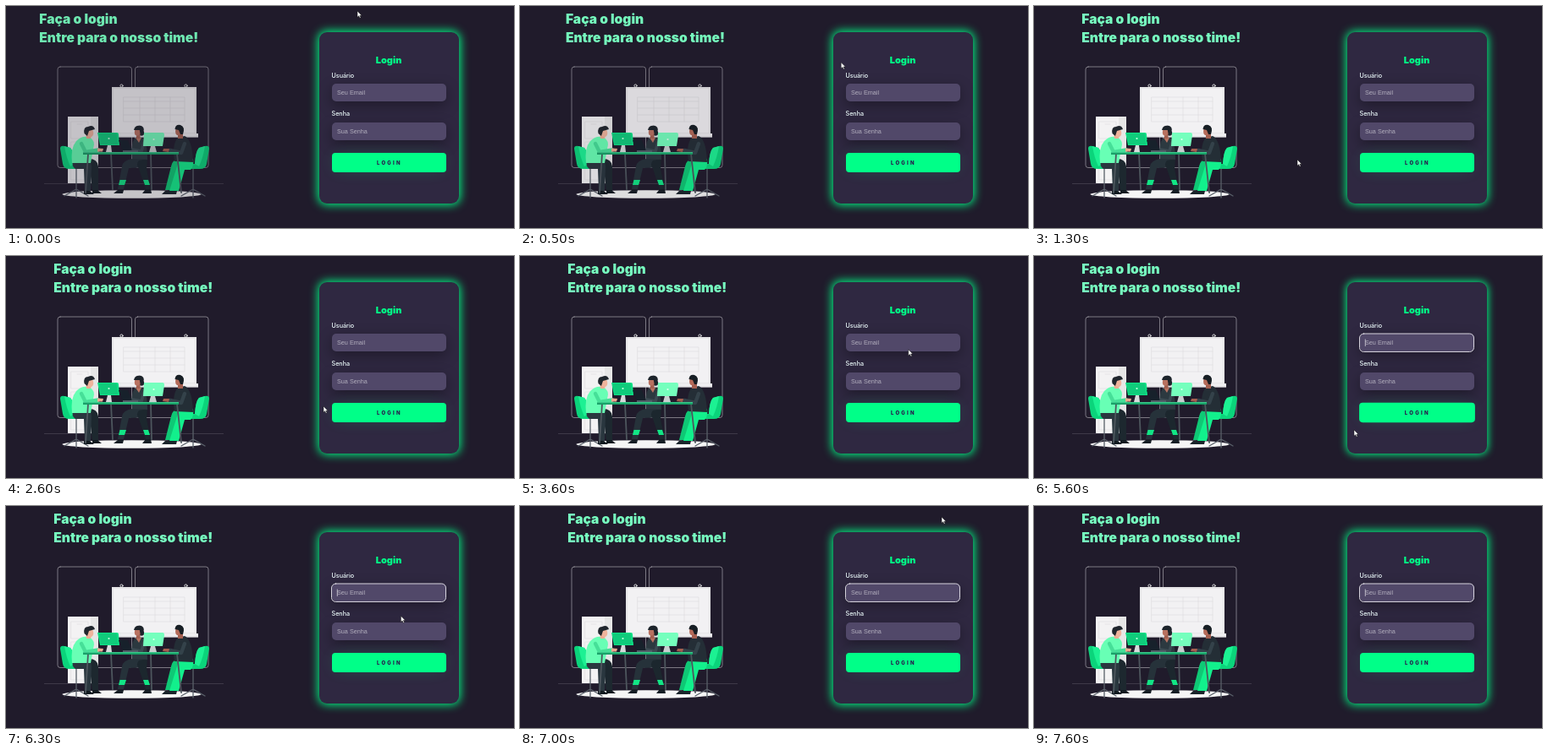
An HTML page that plays this animation: 600 by 263 pixels, repeating every 7.7 s.

```html
<!DOCTYPE html>
<html lang="pt">
<head>
<meta charset="utf-8">
<title>Login</title>
<style>
html, body { margin: 0; width: 100%; height: 100%; overflow: hidden; background: #201b2b; }
#stage { position: relative; width: 600px; height: 263px; overflow: hidden; background: #201b2b; }
#stage div, svg { position: absolute; box-sizing: border-box; }
svg { left: 0; top: 0; }
#card { left: 369.5px; top: 30.5px; width: 165px; height: 203px; border-radius: 9px; background: #2f2841; }
.field { left: 384.5px; width: 135px; height: 21px; border-radius: 5px; background: #514869; box-shadow: 0 5px 16px #00000056; }
#button { left: 384.5px; top: 174px; width: 135px; height: 23px; border-radius: 4px; background: #00ff88; box-shadow: 0 0 20px -6px #00ff8052; }
text { font-family: Inter, "Open Sans", sans-serif; }
.title { font-size: 15.6px; font-weight: 900; fill: #77ffc0; }
.label { font-size: 7.2px; font-weight: 500; fill: #f0ffff; }
.hint { font: 7.25px "Liberation Sans", Arial, sans-serif; fill: #b3afbe; }
.line { fill: none; stroke-linecap: round; stroke-linejoin: round; }
</style>
</head>
<body>
<div id="stage">
<div id="card"></div>
<div class="field" id="user" style="top:92px"></div>
<div class="field" style="top:137.5px"></div>
<div id="button"></div>
<svg width="600" height="263" viewBox="0 0 600 263">
  <g id="title" class="title">
    <text x="56.3" y="20.5">Faça o login</text>
    <text x="56.3" y="43">Entre para o nosso time!</text>
  </g>

  <g id="scene">
    <!-- room -->
    <g class="line" stroke="#a5a3aa" stroke-width=".7">
      <rect x="61" y="72" width="87.5" height="119.5" rx="3"/>
      <rect x="152.5" y="72" width="86.5" height="119.5" rx="3"/>
    </g>
    <path d="M45 210.5H257" stroke="#4b4755" stroke-width=".7"/>
    <ellipse cx="148.5" cy="223" rx="82" ry="4.8" fill="#f5f5f5"/>
    <path d="M73 131H109V210H73Z" fill="#e6e6e6"/>
    <path d="M73 131H100V210H73Z" fill="#f3f2f3"/>
    <path class="line" d="M77 137H97V157H77ZM77 161H97V181H77ZM77 185H97V206H77ZM84 140H90M84 164H90M84 188H90" stroke="#dedde0" stroke-width=".7"/>
    <g class="line" stroke="#e4e4e4">
      <circle cx="136.5" cy="94.5" r="1.6"/>
      <circle cx="212.5" cy="94.5" r="1.6"/>
    </g>
    <path d="M125 96H225V152H125Z" fill="#e6e5e7"/>
    <path d="M127 98H223V150H127Z" fill="#f2f1f3"/>
    <path d="M123 151H227V155.5H123Z" fill="#efeef0"/>
    <path d="M123 155H227" stroke="#cfced2" stroke-width=".6"/>
    <path class="line" d="M139 108H211V137H139ZM139 113H211M139 121H211M139 129H211M158 108V137M176 108V137M194 108V137" stroke="#dcdbde" stroke-width=".6"/>

    <!-- chairs -->
    <g id="chair">
      <path class="line" d="M83 192V218M83 217L69 225M83 217L97 225M83 217V227" stroke="#596069" stroke-width="1.3"/>
      <path d="M64 169Q64 165 69 166L76 168Q80 172 81 187H98Q100 193 96 193H75Q68 193 67 187Z" fill="#0bd47b"/>
      <path d="M69 166L76 168Q80 172 81 187L76 190Q71 179 69 166Z" fill="#1cf193"/>
    </g>
    <use href="#chair" transform="translate(304 0) scale(-1 1)"/>

    <!-- person at the left -->
    <path d="M80 181H98Q108 181 109 190L109 219H102L99 193L84 191Q79 190 80 181Z" fill="#1d282f"/>
    <path d="M79 181H95Q101 182 101 190L100 219H93L92 193H82Q77 190 79 181Z" fill="#2a373f"/>
    <path d="M92 219H99L104 223H92ZM102 218H108L113 222H102Z" fill="#121a20"/>
    <path d="M78 186Q76 168 83 160Q89 154 96 155Q104 157 104 164L100 186Z" fill="#68ffb5"/>
    <path class="line" d="M89 163L94 173L109 170.5" stroke="#46df98" stroke-width="4.4"/>
    <path d="M108 168.5L115 169L114 172.5L108 172.5ZM94 150L101 150L100 157L95 157Z" fill="#ecaa91"/>
    <ellipse cx="99.5" cy="150.5" rx="3.8" ry="5" fill="#efb39c"/>
    <path d="M92.5 151Q91 143 97 143Q103 140 105 146L98 148L96 154Z" fill="#20262d"/>

    <!-- person in the middle -->
    <path d="M166 180L149 181Q138 183 137 190L132 217H139L145 192L166 191Z" fill="#26323a"/>
    <path d="M167 181L157 183Q153 187 157 193L165 217H171L166 193Z" fill="#1c272e"/>
    <path d="M134.5 206H142L140 212H133ZM162 206H168L170 212H164Z" fill="#12e585"/>
    <path d="M132 218H139L138 222H127ZM165 217H171L172 222H161Z" fill="#161e25"/>
    <path d="M149 181Q147 163 152 157L160 156Q167 159 167 182Z" fill="#2c3940"/>
    <path class="line" d="M163 162L160 172L149 170" stroke="#3c4b53" stroke-width="3.6"/>
    <path d="M153 156L157 162L160 156Z" fill="#b87160"/>
    <circle cx="158" cy="146.5" r="4.8" fill="#1d242b"/>
    <circle cx="160" cy="150.5" r="3.2" fill="#1d242b"/>
    <path d="M154 150H158.5V157H154Z" fill="#a45f50"/>
    <ellipse cx="155" cy="149.5" rx="3.2" ry="4.3" fill="#b87160"/>
    <path d="M151 147Q152 141 159 142L159 147Z" fill="#1d242b"/>

    <!-- person at the right -->
    <path d="M221 181H205Q196 182 195 190L188 218H197L205 194H217Q222 191 221 181Z" fill="#0fc875"/>
    <path d="M221 181H210Q203 182 202 190L193 219H204L211 194H218Q222 191 221 181Z" fill="#12f08c"/>
    <path d="M188 219H202L201 223H184Z" fill="#1b242b"/>
    <path d="M199 184Q196 163 203 156L211 154Q220 158 221 185Z" fill="#242e36"/>
    <path class="line" d="M211 163L207 174L194 171" stroke="#34424a" stroke-width="4.4"/>
    <path d="M186 169L193 169L192 173L185 172ZM203 151H209V157H203Z" fill="#a45f50"/>
    <ellipse cx="203.5" cy="148.5" rx="3.4" ry="4.7" fill="#b56b59"/>
    <path d="M199.5 146Q200 140 206 141Q212 143 209 152L206 152L204 147Z" fill="#171e24"/>

    <!-- desk -->
    <path class="line" d="M97 175L94 221M124 175L126 217M171 175L172 217M202 175L207 221" stroke="#4d565d" stroke-width="1.8"/>
    <path d="M91 173H204V176H91Z" fill="#159b63"/>
    <path d="M91 173H204V174.3H91Z" fill="#3ac98b"/>
    <path d="M108 150H131Q133 150 133 152L134 165H111Z" fill="#0de386"/>
    <path d="M109 151H131L132 164H112Z" fill="#10cb7b"/>
    <circle cx="121.5" cy="157" r="1.1" fill="#c4ffe2"/>
    <path d="M120 165H124L125 173H118Z" fill="#d7dadb"/>
    <path d="M163 150H185Q187 150 187 153L185 166H162Z" fill="#75ffbd"/>
    <circle cx="174.5" cy="158" r="1.1" fill="#e2fff1"/>
    <path d="M171 166H176L178 173H169Z" fill="#c9cfd0"/>
    <path d="M133 159H144L149 172H138Z" fill="#17212b"/>
    <path d="M138 171H156V173H138Z" fill="#52606a"/>
  </g>

  <text x="452" y="68.3" text-anchor="middle" font-size="11" font-weight="900" fill="#00ff88">Login</text>
  <text class="label" x="384.5" y="85">Usuário</text>
  <text class="label" x="384.5" y="130.4">Senha</text>
  <text class="hint" x="391" y="105">Seu Email</text>
  <text class="hint" x="391" y="150.6">Sua Senha</text>
  <text id="buttonText" x="438" y="187.8" font-size="6" font-weight="800" letter-spacing="2.2" fill="#2b134b">LOGIN</text>
  <rect id="ring" class="line" x="384.5" y="92" width="135" height="21.5" rx="5" stroke="#e8e6ee" stroke-width=".9"/>
  <path id="caret" d="M391.3 98.5V107" stroke="#fff" stroke-width=".6"/>
  <path id="cursor" d="M0 0V7.2L1.7 5.7L2.9 8.3L4.1 7.7L2.9 5.2H5.2Z" fill="#fff" stroke="#111" stroke-width=".5"/>
</svg>
</div>
<script>
const LOOP = 7700, STEP = 100, FOCUS = 4050, BLINK = 530, PULSE = 3650;
const el = id => document.getElementById(id);
const [title, scene, card, ring, button, buttonText, caret, cursor] =
  ['title', 'scene', 'card', 'ring', 'button', 'buttonText', 'caret', 'cursor'].map(el);

// Each point: time, then values.
const path = [
  [0, 415, 6], [300, 402, 28], [800, 345, 125], [1300, 311, 182], [1600, 362, 186],
  [2000, 371, 182], [2600, 375, 178], [2900, 470, 186], [3100, 585, 175],
  [3300, 530, 125], [3700, 435, 106], [4050, 402, 104], [4400, 401, 128],
  [4650, 575, 160], [4900, 500, 186], [5300, 425, 189], [5600, 378, 206],
  [5900, 392, 211], [6400, 485, 110], [7000, 498, 13], [7200, 500, -12], [7700, 500, -12]
];
const hover = [[0, 0], [2600, 0], [2800, 1], [3000, 1], [3200, 0], [4800, 0], [5000, 1], [5500, 1], [5800, 0], [7700, 0]];

function track(points, t) {
  const i = Math.max(1, points.findIndex(p => p[0] >= t));
  const a = points[i - 1], b = points[i];
  const k = (t - a[0]) / (b[0] - a[0]);
  return a.slice(1).map((v, j) => v + (b[j + 1] - v) * k);
}

function draw(t) {
  const slide = (1 - Math.min(1, t / 800)) ** 2;
  title.setAttribute('transform', `translate(${-17 * slide} 0)`);
  title.style.opacity = 1 - .1 * slide;
  scene.style.opacity = .78 + .22 * Math.min(1, t / 1000);

  const glow = (1 + Math.cos(2 * Math.PI * t / PULSE)) / 2;
  card.style.boxShadow = `0 0 ${10 + glow}px ${1 + .5 * glow}px #00ff88`;

  const focused = t >= FOCUS;
  ring.style.opacity = +focused;
  caret.style.opacity = +(focused && (t - FOCUS) % (2 * BLINK) < BLINK);

  const scale = 1 + .02 * track(hover, t)[0];
  button.style.transform = `scale(${scale})`;
  buttonText.setAttribute('transform', `translate(452 185.5) scale(${scale}) translate(-452 -185.5)`);
  cursor.setAttribute('transform', `translate(${track(path, t)})`);
}

const start = performance.now();
function frame() {
  const t = (performance.now() - start) % LOOP;
  draw(Math.floor(t / STEP) * STEP);
  requestAnimationFrame(frame);
}
frame();
</script>
</body>
</html>
```
